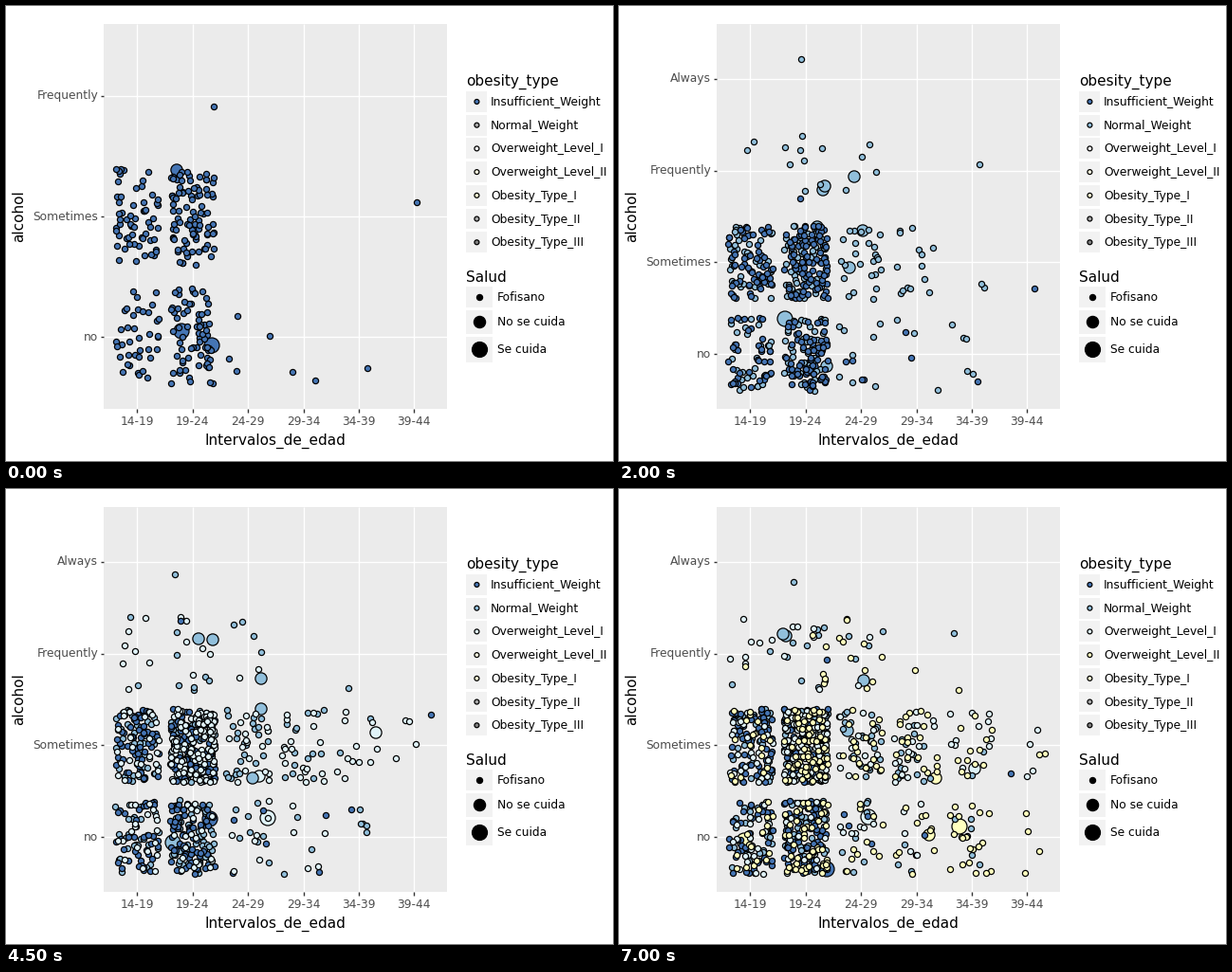
Recreate the animation shown at these times as a matplotlib script. Size 640 px wide and 480 px high, loop 8000 ms.

```python
import numpy as np
import matplotlib.pyplot as plt
from matplotlib.animation import FuncAnimation
from matplotlib.patches import Rectangle

W, H = 640, 480
LEFT, RIGHT, TOP, BOTTOM = 103.36, 465.36, 18.75, 425.25
STEP = (RIGHT - LEFT) / 6.2
K = np.pi ** 0.5          # marker scale in points per size unit
SMALL, MID, BIG = 2, 20 ** 0.5, 6

AGES = [f"{a}-{a + 5}" for a in range(14, 40, 5)]
LEVELS = ["no", "Sometimes", "Frequently", "Always"]
TYPES = ["Insufficient_Weight", "Normal_Weight", "Overweight_Level_I",
         "Overweight_Level_II", "Obesity_Type_I", "Obesity_Type_II",
         "Obesity_Type_III"]
DARK, LIGHT, PALE, YELLOW = FILL = ["#4575b4", "#91bfdb", "#e0f3f8", "#ffffbf"]
UNUSED = ["#4575b4", "#a9a9a9", "#f2f2f2", "#fffde0", "#f2f2d0", "#a9a9a9", "#808080"]

# People per age group, for the levels no, Sometimes and Frequently
COUNTS = {
    LIGHT: [[26, 55, 8, 3, 5, 0], [42, 78, 25, 14, 2, 0], [2, 8, 4, 0, 1, 0]],
    DARK: [[38, 70, 4, 2, 1, 0], [60, 93, 0, 0, 0, 0], [0, 0, 0, 0, 0, 0]],
    PALE: [[20, 20, 7, 5, 0, 0], [26, 124, 17, 18, 11, 4], [7, 6, 2, 0, 0, 0]],
    YELLOW: [[16, 52, 12, 10, 20, 4], [18, 72, 18, 20, 12, 2], [1, 6, 10, 1, 1, 0]],
}

plt.rcParams["font.family"] = "DejaVu Sans"
fig = plt.figure(figsize=(W / 100, H / 100), dpi=100, facecolor="white")
ax = fig.add_axes([0, 0, 1, 1])
ax.set_xlim(0, W)
ax.set_ylim(H, 0)
ax.axis("off")


def box(x0, y0, x1, y1, color):
    ax.add_patch(Rectangle((x0, y0), x1 - x0, y1 - y0, fc=color, lw=0, zorder=0))


def line(xs, ys, color):
    return ax.plot(xs, ys, color=color, lw=1, solid_capstyle="butt", zorder=1)[0]


def text(x, y, s, size=8.8, color="black", **kw):
    return ax.text(x, y, s, fontsize=size, color=color, **kw)


def dots(xs, ys, size, colors):
    area = ((np.asarray(size) + 0.5) * K) ** 2
    return ax.scatter(xs, ys, s=area, c=colors, edgecolors="black",
                      linewidths=0.5 * K, zorder=3)


def age_x(col):
    return LEFT + (col + 0.6) * STEP


def key_y(i):
    return 100.95 + 24.72 * i


def draw_fixed():
    box(LEFT, TOP, RIGHT, BOTTOM, "#ebebeb")
    for col, age in enumerate(AGES):
        x = age_x(col)
        line([x, x], [TOP, BOTTOM], "white")
        line([x, x], [BOTTOM, BOTTOM + 3.8], "#333333")
        text(x, 442, age, color="#4d4d4d", ha="center")
    text(284, 463, "Intervalos_de_edad", 11, ha="center")
    text(18, 222, "alcohol", 11, rotation=90, rotation_mode="anchor", ha="center")

    text(485, 84, "obesity_type", 11)
    for i, name in enumerate(TYPES):
        y = key_y(i)
        box(485, y - 10.9, 507, y + 10.9, "#f2f2f2")
        text(511, y + 4, name)

    text(485, 291, "Salud", 11)
    for name, y, half, size in [("Fofisano", 307.2, 10.9, SMALL),
                                ("No se cuida", 333.2, 12.3, MID),
                                ("Se cuida", 362.3, 13.8, BIG)]:
        box(485, y - half, 513.3, y + half, "#f2f2f2")
        dots([499], [y], [size], ["black"])
        text(517.5, y + 4, name)


def scene(kinds, rows, lone, large):
    """Build one state: jittered groups plus a few lone and large dots."""
    rng = np.random.default_rng(kinds)
    unit = (BOTTOM - TOP) / (rows + 0.2)
    parts = []
    for row in range(rows):
        y = BOTTOM - (row + 0.6) * unit
        parts += [line([LEFT, RIGHT], [y, y], "white"),
                  line([LEFT - 3.8, LEFT], [y, y], "#333333"),
                  text(97, y, LEVELS[row], color="#4d4d4d", ha="right", va="center")]

    colors, sizes, xs, ys = zip(*large)
    parts.append(dots(xs, ys, sizes, colors))
    shown = FILL[:kinds]
    for color, table in COUNTS.items():
        if color not in shown:
            continue
        for row, counts in enumerate(table):
            cols = np.repeat(np.arange(len(AGES)), counts)
            jitter = rng.uniform(-0.4, 0.4, (2, len(cols)))
            parts.append(dots(age_x(cols + jitter[0]),
                              BOTTOM - (row + 0.6 + jitter[1]) * unit, SMALL, color))
    for color, (x, y) in zip([DARK, DARK, LIGHT], lone):
        parts.append(dots([x], [y], SMALL, color))

    n = len(TYPES)
    parts.append(dots([496.4] * n, [key_y(i) for i in range(n)], 1.5,
                      shown + UNUSED[kinds:]))
    return parts


draw_fixed()

scenes = [
    scene(1, 3, [(219, 106), (433, 207)],
          [(DARK, MID, 180, 173), (DARK, BIG, 185, 343), (DARK, BIG, 217, 358)]),
    scene(2, 4, [(191, 203), (438, 298), (192, 56)],
          [(LIGHT, MID, 248, 180), (LIGHT, MID, 215, 194), (LIGHT, MID, 217, 190),
           (LIGHT, MID, 257, 237), (LIGHT, MID, 243, 276), (LIGHT, BIG, 175, 330),
           (LIGHT, MID, 219, 380), (LIGHT, MID, 209, 233), (DARK, BIG, 202, 381)]),
    scene(3, 4, [(184, 139), (448, 238), (178, 90)],
          [(LIGHT, MID, 203, 158), (LIGHT, MID, 218, 159), (LIGHT, MID, 269, 200),
           (LIGHT, MID, 269, 232), (PALE, MID, 390, 257), (PALE, MID, 267, 303),
           (LIGHT, MID, 260, 305), (PALE, BIG, 276, 347), (DARK, BIG, 215, 348),
           (LIGHT, BIG, 176, 373)]),
    scene(4, 4, [(219, 180), (413, 300), (184, 98)],
          [(LIGHT, MID, 176, 155), (LIGHT, MID, 173, 153), (LIGHT, MID, 258, 202),
           (PALE, MID, 375, 295), (YELLOW, MID, 334, 305), (LIGHT, MID, 241, 255),
           (YELLOW, BIG, 359, 356), (YELLOW, MID, 327, 365), (PALE, BIG, 263, 346),
           (DARK, BIG, 219, 401), (YELLOW, BIG, 132, 371)]),
]


def update(i):
    current = (i + 4) // 5    # the first state is short, the others last five steps
    for n, parts in enumerate(scenes):
        for part in parts:
            part.set_visible(n == current)
    return []


anim = FuncAnimation(fig, update, frames=16, interval=500, repeat=True,
                     repeat_delay=0, init_func=lambda: update(0), blit=False)
plt.show()
```
